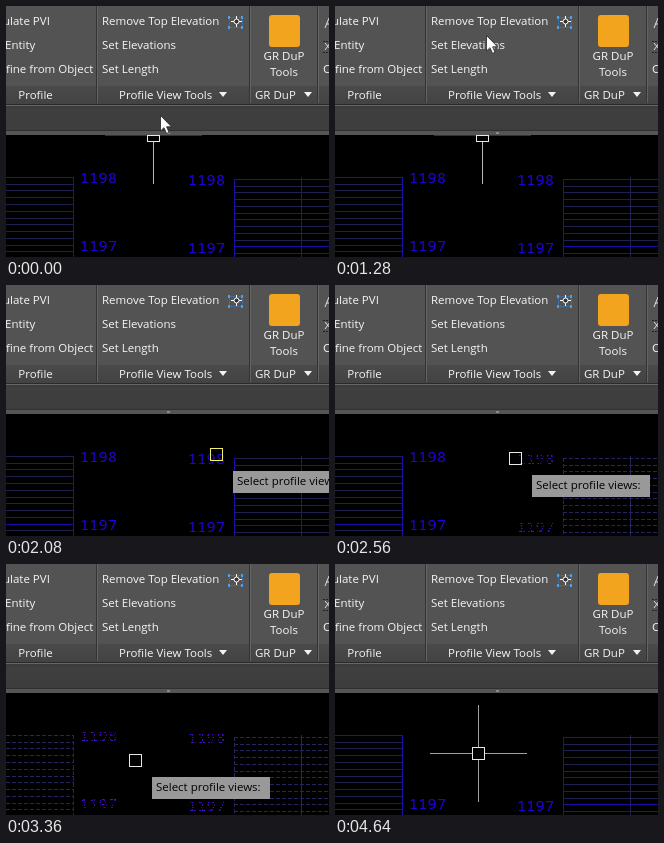
An HTML page that plays this animation: 323 px wide and 251 px high, repeating every 5.2 s.

```html
<!DOCTYPE html>
<html lang="en">
<head>
<meta charset="utf-8">
<title>Remove top elevation</title>
<style>
html, body { margin: 0; width: 100%; height: 100%; overflow: hidden; background: #000; }
svg { display: block; width: 323px; height: 251px; }
text { font: 11.5px "Open Sans", "Noto Sans", sans-serif; fill: #f6f6f6; white-space: pre; }
.mid { text-anchor: middle; }
.label text { font: 300 15px "Noto Sans Mono", "DejaVu Sans Mono", monospace; letter-spacing: .3px; fill: #2400e0; }
.grid path { fill: none; stroke: #20204e; }
.grid .major { stroke: #1c0ca8; }
.picked .grid path { stroke: #26265e; stroke-dasharray: 4 2; }
.picked .label text { fill: url(#dots); }
#tip text { fill: #000; }
</style>
</head>
<body>
<svg viewBox="0 0 323 251">
  <defs>
    <clipPath id="area"><rect y="129" width="323" height="122"/></clipPath>
    <pattern id="dots" width="4" height="5" patternUnits="userSpaceOnUse">
      <path d="M0 0h3v2h-3zM1 3h3v1h-3z" fill="#4a10d0"/>
    </pattern>
    <linearGradient id="band" x2="0" y2="1">
      <stop stop-color="#363636"/><stop offset=".2" stop-color="#3f3f3f"/><stop offset="1" stop-color="#3d3d3d"/>
    </linearGradient>
    <linearGradient id="title" x2="0" y2="1">
      <stop stop-color="#4a4a4a"/><stop offset="1" stop-color="#434343"/>
    </linearGradient>
    <linearGradient id="pressed" x2="0" y2="1">
      <stop stop-color="#404040"/><stop offset="1" stop-color="#4e4e4e"/>
    </linearGradient>
  </defs>

  <rect width="323" height="251"/>
  <g id="left"></g>
  <g id="right"></g>

  <!-- ribbon -->
  <rect width="323" height="98" fill="#535353"/>
  <rect y="80" width="323" height="18" fill="url(#title)"/>
  <rect id="strip" x="92" y="80" width="150" height="17" fill="#858585"/>
  <path d="M90.5 0V97M243.5 0V97M311.5 0V97" stroke="#343434"/>
  <path d="M91.5 0V97M244.5 0V97M312.5 0V97" stroke="#636363"/>
  <rect y="98" width="323" height="27" fill="url(#band)"/>
  <path d="M0 98.5H323" stroke="#2b2b2b"/>
  <path d="M0 99.5H323" stroke="#666"/>
  <rect y="125" width="323" height="4" fill="#555"/>
  <path d="M0 124.5H323" stroke="#303030"/>
  <path d="M161 127h3" stroke="#888" stroke-width="2"/>
  <rect id="button" x="94.5" y="6.5" width="120" height="21" rx="1" fill="url(#pressed)" stroke="#262626"/>

  <text x="-3" y="19">ulate PVI</text>
  <text x="-1" y="43">Entity</text>
  <text x="0" y="67">fine from Object</text>
  <text class="mid" x="29.5" y="93">Profile</text>
  <text x="96" y="19">Remove Top Elevation</text>
  <text x="96" y="43">Set Elevations</text>
  <text x="96" y="67">Set Length</text>
  <text x="113" y="93">Profile View Tools</text>
  <text class="mid" x="278" y="54">GR DuP</text>
  <text class="mid" x="278" y="70">Tools</text>
  <text x="249" y="93">GR DuP</text>
  <text x="317" y="67">C</text>
  <path d="M213 86h8l-4 5zM298 86h8l-4 5z" fill="#f2f2f2"/>
  <rect x="263" y="9" width="31" height="32" rx="3" fill="#f3a41f"/>

  <g fill="none">
    <path d="M223.5 11.5H236.5V21.5H223.5Z" stroke="#3c78b4" stroke-dasharray="2 1"/>
    <path d="M222 10h2v3h-2zM235 10h2v3h-2zM222 20h2v3h-2zM235 20h2v3h-2z" fill="#4ba0e8"/>
    <circle cx="230.5" cy="15.5" r="2.5" fill="#333" stroke="#fff"/>
    <path d="M230.5 10v3M230.5 18v3M225 15.5h3M233 15.5h3" stroke="#fff"/>
    <path d="M319 22l4-10 2 3M320 18h5M319 37l5 6M319 44l5-7" stroke="#ddd"/>
    <path d="M317 35.5h6M317 46.5h6" stroke="#222" stroke-dasharray="2 1"/>
  </g>

  <!-- pointers -->
  <g clip-path="url(#area)">
    <g id="cross" fill="none">
      <path id="across" d="M-48 .5H-6M7 .5H49"/>
      <path id="down" d="M.5 -48V-6M.5 7V49"/>
      <rect id="box" x="-5.5" width="12"/>
    </g>
    <g id="tip">
      <rect width="118" height="22" fill="#999"/>
      <text x="4" y="14">Select profile views:</text>
    </g>
  </g>
  <path id="arrow" d="M.5 .5V16L4 12.7L6.5 18.4L9 17.3L6.6 11.8H11.5Z" fill="#fff" stroke="#222" stroke-width=".8"/>
</svg>
<script>
const LOOP = 5200, STEP = 80, ROW = 6.77;
const $ = id => document.getElementById(id);

// Pointer keys: time, x, y
const keys = [
  [0, 154, 109], [960, 154, 109], [1040, 154, 72], [1360, 150, 14],
  [1680, 150, 14], [2080, 210, 169], [2160, 210, 170], [2320, 208, 173],
  [2400, 208, 173], [2960, 111, 173], [3120, 111, 173], [3440, 135, 204],
  [4080, 135, 204], [4480, 142, 190], [4560, 142, 190], [4640, 143, 189]
];

function pointer(t) {
  const i = keys.findIndex(k => k[0] > t);
  if (i < 0) return keys.at(-1).slice(1);
  const [t0, x0, y0] = keys[i - 1], [t1, x1, y1] = keys[i];
  const p = (t - t0) / (t1 - t0);
  return [Math.round(x0 + (x1 - x0) * p), Math.round(y0 + (y1 - y0) * p)];
}

function buildView(id, x0, x1, top, edge, labelX) {
  const row = i => `M${x0} ${Math.round(top + i * ROW) + .5}H${x1}`;
  let rows = "";
  for (let i = 0; i < 12; i++) rows += row(i);
  const y = Math.round(top);
  $(id).innerHTML = `<g class="grid"><path d="${rows}M295.5 ${y}V251"/>
    <path class="major" d="${row(10)}M${edge}.5 ${y}V251"/></g>
    <g class="label"><text class="top" x="${labelX}" y="${y + 6}">1198</text>
    <text x="${labelX}" y="${y + 74}">1197</text></g>`;
}
buildView("left", 0, 68, 170.9, 67, 74);
buildView("right", 228, 323, 172.75, 228, 182);
const topLabels = document.querySelectorAll(".top");

const show = (el, on) => el.setAttribute("display", on ? "inline" : "none");
const move = (el, x, y) => el.setAttribute("transform", `translate(${x} ${y})`);
const set = (id, name, value) => $(id).setAttribute(name, value);

function draw(time) {
  const t = Math.floor(time / STEP) * STEP;
  const [x, y] = pointer(t);
  const idle = t < 1680, done = t >= 3920;
  const picking = !idle && !done && y >= 128;
  const flash = t === 2080 || t === 3920;

  show($("strip"), t === 1040);
  show($("button"), y < 28);
  show($("arrow"), t < 2080 && y < 128);
  move($("arrow"), x, y);

  show($("cross"), idle || picking || done);
  move($("cross"), idle ? 147 : x, idle ? 129 : y);
  show($("across"), idle || done);
  show($("down"), idle || done);
  set("across", "stroke", idle ? "#333" : t === 3920 ? "#f00000" : "#a0a0a0");
  set("down", "stroke", idle ? "#b8b8b8" : t === 3920 ? "#d8d8d8" : "#a0a0a0");
  set("box", "stroke", flash ? "#f0f060" : "#e8e8e8");
  set("box", "y", idle ? .5 : -5.5);
  set("box", "height", idle ? 6 : 12);

  show($("tip"), picking || t === 3920);
  move($("tip"), x + 17, y + 17);

  $("right").classList.toggle("picked", t >= 2480 && !done);
  $("left").classList.toggle("picked", t >= 3040 && !done);
  topLabels.forEach(label => show(label, !done));
}

const start = performance.now();
function frame() {
  draw((performance.now() - start) % LOOP);
  requestAnimationFrame(frame);
}
frame();
</script>
</body>
</html>
```
